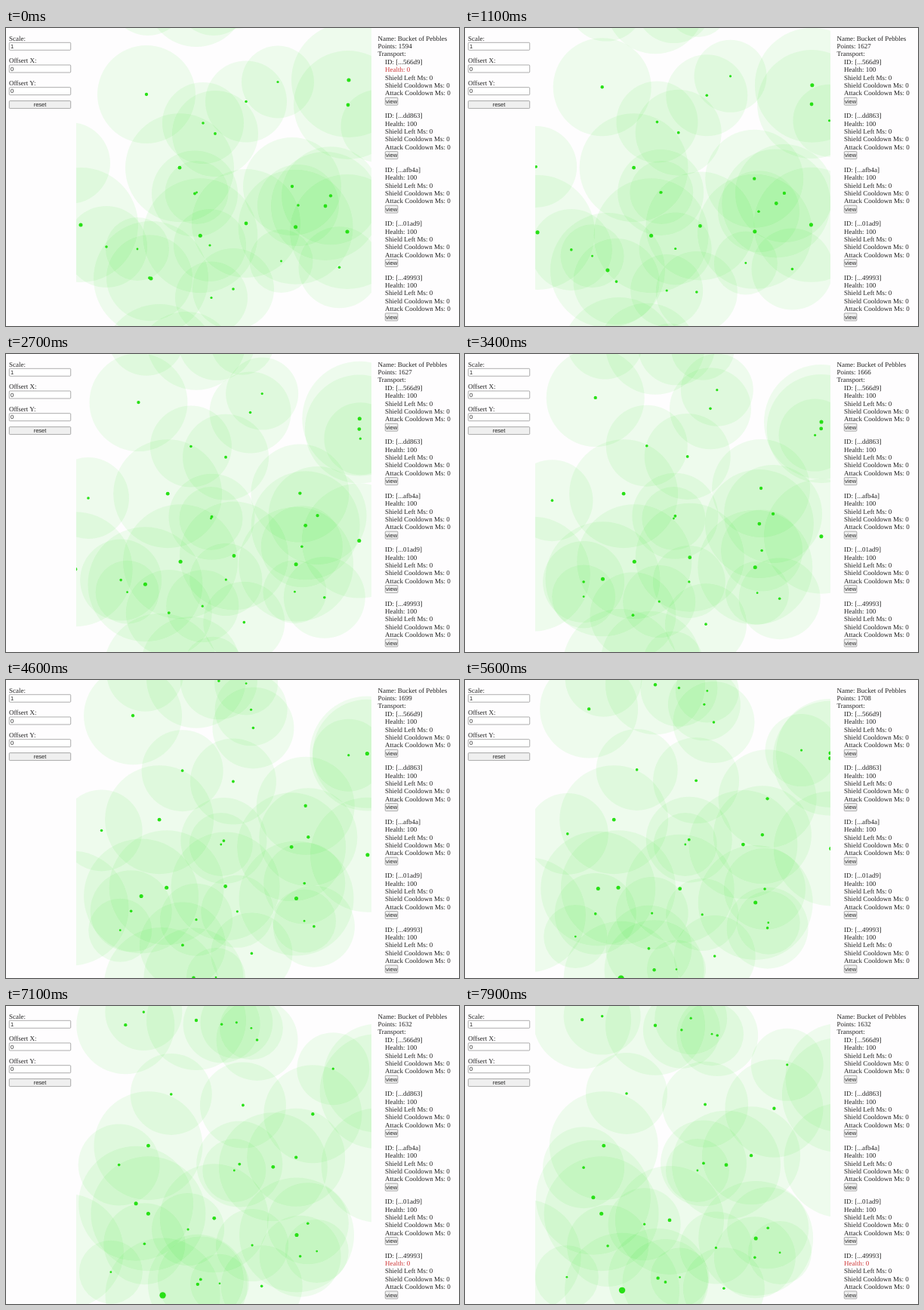
An HTML page with a canvas that plays this animation: 600x395 px, repeating every 8 s.

```html
<!DOCTYPE html>
<html lang="en">
<head>
<meta charset="utf-8">
<title>Arena viewer</title>
<style>
  html, body { margin: 0; width: 600px; height: 395px; overflow: hidden; background: #fefdfe; }
  canvas, svg { position: absolute; left: 0; top: 0; }
  text { font: 9px "Liberation Serif", "Times New Roman", serif; fill: #222; text-rendering: geometricPrecision; }
  .ui { font: 7.5px "Liberation Sans", Arial, sans-serif; }
  .mid { text-anchor: middle; }
  .dead { fill: #cf3a3a; }
  rect { stroke: #767676; stroke-width: .6; }
</style>
</head>
<body>
<canvas id="field" width="600" height="395"></canvas>
<svg id="panel" width="600" height="395"></svg>
<script>
const LOOP = 8000, STEP = 100;
const FIRST_HIT_END = 500, LAST_HIT = 7100;

// Every ship drifts in a straight line; speeds are in px per second.
const ships = [];
function fleet(reach, ...members) {
  for (const [x, y, vx, vy = 0] of members) ships.push({ x, y, vx, vy, reach, dot: reach / 30 });
}
// Arrivals start just beyond the top or bottom edge.
function arrive(x, vx, vy, dot = 1.7) {
  ships.push({ x, y: vy > 0 ? -41 : 442, vx, vy, dot, reach: Math.min(76, dot * 30) });
}

fleet(76, [454, 69, 5.3, 6.2], [452, 270, 5.85, -8.3], [99, 261, -2.7, 9],
  [192, 332, -2.8, -9.9], [257.3, 275.2, -9.7], [383.6, 263.7, .2, 5.6]);
fleet(72, [453, 102, 5.5, -.9], [423, 236, -9.75, -3.2], [318, 259, -5.95, 3.15], [230, 185.2, -5.85]);
fleet(65, [186, 88, -3.9, -8.85], [379, 210, 3.85, -9.4], [430, 222.3, -6.45, -3.05]);
fleet(57, [277, 140, 5.2, -1.2], [190, 331.2, 9.55, 4.4], [250, 219.5, 8.35, -1.4]);
fleet(54, [318, 97.5, 2.05, -7.4], [261, 126, -5.95, -1.27], [387, 235, 1.8, 7.5],
  [441.5, 317.3, -7.3, 2.03], [133, 290, 7.1, 3.55], [84, 179, 9.25, 4.45], [301, 346, 5.3, 3.57]);
fleet(48, [360, 71.5, -7.7, -7], [491.5, 130, -8.2, -6.6], [270, 288, 7.9, 4.1], [272, 357.5, -4.35, -8.65]);
fleet(42, [364.5, 309, 6.65, 2.27], [174, 293, -4.95, 8.4], [252.6, 218, 7]);
arrive(252, 0, 8.45, 2.2);
arrive(275, 1.5, 9.2);
arrive(188, -.8, 6.9);
arrive(305.7, 2.7, 9.9, 1.4);
arrive(238.6, 2.15, -10.3, 2.2);
arrive(268.8, 2, -10.45, 1.3);
arrive(203.3, .6, -8.25, 4.2);

function score(time) {
  if (time < FIRST_HIT_END) return 1594;
  if (time < 2900) return 1627;
  if (time < 4000) return 1666;
  if (time < 5000) return 1699;
  return time < LAST_HIT ? 1708 : 1632;
}

const panel = document.getElementById("panel");
function add(tag, attrs, content = "") {
  const node = document.createElementNS("http://www.w3.org/2000/svg", tag);
  for (const key in attrs) node.setAttribute(key, attrs[key]);
  node.textContent = content;
  return panel.appendChild(node);
}
const label = (x, y, content, cls = "") => add("text", { x, y, class: cls }, content);
const box = (x, y, width, height, fill) => add("rect", { x, y, width, height, fill, rx: 1 });
function button(x, y, width, content) {
  box(x, y, width, 10, "#efefef");
  label(x + width / 2, y + 7.6, content, "ui mid");
}

[["Scale:", "1"], ["Offsert X:", "0"], ["Offsert Y:", "0"]].forEach(([name, value], i) => {
  const y = 16.5 + i * 29.7;
  label(4, y, name);
  box(4.3, y + 2.8, 81.4, 10, "#fff");
  label(6, y + 10.5, value, "ui");
});
button(4.3, 96.6, 81.4, "reset");

label(492.5, 16.6, "Name: Bucket of Pebbles");
const points = label(492.5, 27, "");
label(492.5, 37.4, "Transport:");
const healths = ["566d9", "dd863", "afb4a", "01ad9", "49993"].map((id, i) => {
  const x = 502, y = 47.8 + i * 71.45;
  label(x, y, `ID: [...${id}]`);
  const health = label(x, y + 10.4, "");
  ["Shield Left", "Shield Cooldown", "Attack Cooldown"].forEach((name, row) =>
    label(x, y + 10.4 * (row + 2), `${name} Ms: 0`));
  button(x + .3, y + 44.4, 16.6, "view");
  return health;
});

const ctx = document.getElementById("field").getContext("2d");
ctx.beginPath();
ctx.rect(93, 0, 391, 395);
ctx.clip();

function disc(ship, seconds, radius, color) {
  ctx.fillStyle = color;
  ctx.beginPath();
  ctx.arc(ship.x + ship.vx * seconds, ship.y + ship.vy * seconds, radius, 0, 2 * Math.PI);
  ctx.fill();
}

function draw(now) {
  const time = Math.floor(now % LOOP / STEP) * STEP;
  ctx.clearRect(0, 0, 600, 395);
  for (const ship of ships) disc(ship, time / 1000, ship.reach, "rgba(40,220,20,.07)");
  for (const ship of ships) disc(ship, time / 1000, ship.dot, "#28e016");

  points.textContent = "Points: " + score(time);
  healths.forEach((node, i) => {
    const dead = i === 0 && time < FIRST_HIT_END || i === 4 && time >= LAST_HIT;
    node.textContent = "Health: " + (dead ? 0 : 100);
    node.setAttribute("class", dead ? "dead" : "");
  });
  requestAnimationFrame(draw);
}
draw(0);
</script>
</body>
</html>
```
